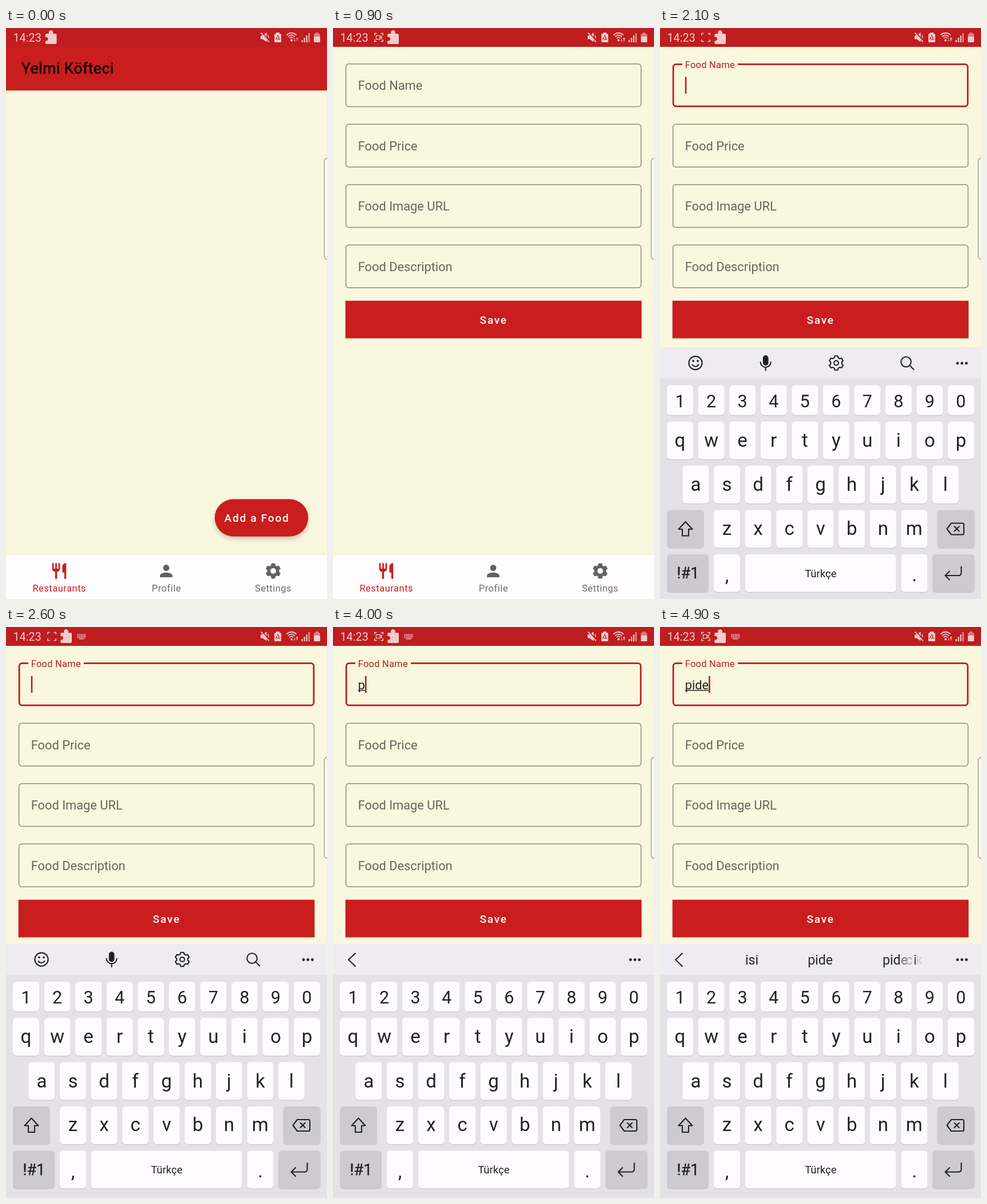
Animation, 561 px wide and 998 px high, one loop 5 s. Source, as an HTML page:

```html
<!DOCTYPE html>
<html lang="en">
<head>
<meta charset="utf-8">
<title>Add a food</title>
<style>
html, body { margin: 0; width: 100%; height: 100%; overflow: hidden; background: #f9f7de; }
svg { display: block; width: 100%; height: 100%; font-family: Roboto, sans-serif; }
text { white-space: pre; }
.mid { text-anchor: middle; }
.btn { font-size: 19.1px; font-weight: 500; letter-spacing: 1.7px; fill: #fff; }
.nav { font-size: 16.4px; letter-spacing: .55px; }
.hint { font-size: 21.84px; fill: #67665c; }
.line { fill: none; stroke: #222; stroke-width: 2.1; stroke-linecap: round; stroke-linejoin: round; }
</style>
</head>
<body>
<svg id="stage" viewBox="0 0 561 998" preserveAspectRatio="none"></svg>
<script>
const LOOP = 5000, TICK = 100;
const RED = '#ca1d1e', DARK_RED = '#b71c20', CREAM = '#f9f7de', INK = '#222', PALE = '#f2cccb';
const TEXT_X = 43.7;

const clamp = (v) => Math.max(0, Math.min(1, v));
const mix = (a, b, u) => a + (b - a) * u;
const within = (t, spans) => spans.some(([from, to]) => t >= from && t < to);

const rect = (x, y, w, h, fill, extra = '') =>
  `<rect x="${x}" y="${y}" width="${w}" height="${h}" fill="${fill}" ${extra}/>`;
const text = (x, y, str, attrs = '') => `<text x="${x}" y="${y}" ${attrs}>${str}</text>`;
const path = (d, attrs = '') => `<path d="${d}" ${attrs}/>`;
const circle = (x, y, r, attrs = '') => `<circle cx="${x}" cy="${y}" r="${r}" ${attrs}/>`;

function gear(cx, cy, outer, inner) {
  const pts = [];
  for (let i = 0; i < 6; i++) {
    const a = (i * 60 - 90) * Math.PI / 180;
    for (const [da, r] of [[-.36, inner], [-.21, outer], [.21, outer], [.36, inner]]) {
      pts.push((cx + r * Math.cos(a + da)).toFixed(2) + ' ' + (cy + r * Math.sin(a + da)).toFixed(2));
    }
  }
  return 'M' + pts.join('L') + 'Z';
}

function statusBar() {
  const bars = [0, 1, 2, 3].map((i) =>
    rect(516.5 + i * 4, 21 - i * 4, 2.2, 4 + i * 4, PALE, i > 2 ? 'opacity=".75"' : '')).join('');
  const arcs = [4.5, 8.2, 12].map((r) => {
    const d = r * .72;
    return path(`M${499 - d} ${21 - d}A${r} ${r} 0 0 1 ${499 + d} ${21 - d}`);
  }).join('');
  let dots = '';
  for (let i = 0; i < 18; i++) dots += rect(124.5 + i % 6 * 2.6, 12.5 + Math.floor(i / 6) * 2.5, 1.7, 1.6, PALE);
  return rect(0, 0, 561, 33, '#bf1d1f') +
    text(12.5, 24, '14:23', `font-size="19.8" fill="${PALE}"`) +
    `<g id="record" fill="none" stroke="${PALE}" stroke-width="1.5">` +
      path('M72.8 13V9.5H76.5M83.5 9.5H87.2V13M87.2 20V23.5H83.5M76.5 23.5H72.8V20') +
      `<g id="camera">${path('M75.5 13.4H82V19.6H75.5ZM82 16L85 14V19L82 17.2', 'stroke-width="1.2"')}</g></g>` +
    `<g id="puzzle" fill="${PALE}">` +
      path('M97 10H101.5A4 4 0 1 1 108.5 10H113Q115 10 115 12V26Q115 28 113 28H97Q95.3 28 95.3 26V22.2A3.4 3.4 0 1 0 95.3 16V12Q95.3 10 97 10Z') + '</g>' +
    `<g id="imeIcon">${dots}${rect(127.5, 20, 9, 1.3, PALE)}</g>` +
    path('M445 13.2H448.5L455.5 8V24.5L448.5 19.5H445Z', `fill="${PALE}"`) +
    path('M446.5 7.6L461 23.6', 'stroke="#bf1d1f" stroke-width="2.4"') +
    path('M445.6 8.4L459.8 24.4', `stroke="${PALE}" stroke-width="1.6"`) +
    path('M457.5 12.5Q459.6 14.8 458.8 17.8', `fill="none" stroke="${PALE}" stroke-width="1.4"`) +
    rect(469, 10, 12, 15, PALE, 'rx="1.6"') + rect(472, 8, 6, 3, PALE) +
    path('M475 13.5L478.2 19.5H471.8Z', 'fill="none" stroke="#bf1d1f" stroke-width="1.5" stroke-dasharray="4.6 1.6"') +
    `<g fill="none" stroke="${PALE}" stroke-width="1.9">${arcs}</g>` + circle(499, 21.5, 2, `fill="${PALE}"`) +
    `<g fill="none" stroke="${PALE}" stroke-width="1.2">` +
      path('M504.5 23V17.5M502.8 21.3L504.5 23.2L506.2 21.3', 'opacity=".6"') +
      path('M508.7 23.2V17.5M507 19.3L508.7 17.4L510.4 19.3', 'id="upload"') + '</g>' +
    bars + rect(538, 10, 11, 15, PALE, 'rx="1.6" opacity=".55"') + rect(541, 8, 5, 2, PALE, 'opacity=".55"') +
    rect(538, 15, 11, 10, PALE, 'rx="1.4"');
}

function navBar() {
  const icon = (cx, d, fill) => path(d, `fill="${fill}" transform="translate(${cx - 16.4} 932.6) scale(1.365)"`);
  const label = (cx, str, fill) => text(cx, 984.5, str, `class="nav mid" fill="${fill}"`);
  return rect(0, 920, 561, 1, '#f1efdc') + rect(0, 921, 561, 77, '#fffdfe') +
    icon(93, 'M11 9H9V2H7v7H5V2H3v7c0 2.1 1.7 3.8 3.75 4V22h2.5v-9C11.3 12.8 13 11.1 13 9V2h-2zM16 6v8h2.5v8H21V2c-2.8 0-5 2.2-5 4z', RED) +
    icon(280, 'M12 12a4 4 0 1 0 0-8a4 4 0 0 0 0 8zM12 14c-2.7 0-8 1.3-8 4v2h16v-2c0-2.7-5.3-4-8-4z', '#626163') +
    path(gear(467, 949, 13.2, 10), 'fill="#626163" stroke="#626163" stroke-linejoin="round"') +
    circle(467, 949, 4.9, 'fill="#fffdfe"') +
    label(93.3, 'Restaurants', RED) + label(280.4, 'Profile', '#6b6a6c') + label(467, 'Settings', '#6b6a6c');
}

function listScreen() {
  return rect(0, 33, 561, 888, CREAM) +
    rect(0, 33, 561, 76, RED, 'style="filter:drop-shadow(0 1px 1.5px #0003)"') +
    text(26.5, 80, 'Yelmi Köfteci', 'font-size="27.3" font-weight="500" fill="#1c0606"') +
    rect(364.8, 823.4, 163.4, 65.4, RED, 'rx="32.7" style="filter:drop-shadow(0 4px 4px #0003)"') +
    `<clipPath id="pill">${rect(364.8, 823.4, 163.4, 65.4, '#fff', 'rx="32.7"')}</clipPath>` +
    `<g clip-path="url(#pill)">${circle(446, 856, 1, 'id="ripple" fill="#fff"')}</g>` +
    text(381.5, 863.3, 'Add a Food', 'class="btn"');
}

function formScreen() {
  const fields = ['Food Name', 'Food Price', 'Food Image URL', 'Food Description'].map((name, i) => {
    const y = 62 + i * 105.5;
    const first = i === 0;
    return rect(22.6, y + .8, 515.8, 74.7, 'none', `rx="5" stroke="#8d8c80" stroke-width="1.5" ${first ? 'id="outline"' : ''}`) +
      (first ? rect(39, 58, 97, 9, CREAM, 'id="notch"') : '') +
      text(TEXT_X, y + 46.1, name, `class="hint" ${first ? 'id="label"' : ''}`);
  }).join('');
  return rect(0, 33, 561, 888, CREAM) + fields +
    text(TEXT_X, 108.5, '', `id="typed" font-size="21.84" fill="${INK}"`) +
    rect(TEXT_X, 110, 0, 1.5, INK, 'id="underline"') +
    rect(TEXT_X, 85.5, 2.6, 29.5, DARK_RED, 'id="cursor"') +
    rect(21.8, 476.7, 517.4, 65.5, RED, 'style="filter:drop-shadow(0 1.5px 1.2px #0003)"') +
    text(256.6, 517, 'Save', 'class="btn"');
}

function keyboard() {
  const STEP = 54.55, WHITE = '#fdfbfe', GREY = '#cdcbcf';
  const key = (x, y, w, h, fill, id = '') =>
    rect(x, y + 1.2, w, h, '#c9c7cc', 'rx="6"') + rect(x, y, w, h, fill, `rx="6" ${id}`);
  const row = (chars, x, y, h, base, size) => [...chars].map((c, i) =>
    key(x + i * STEP, y, 46, h, WHITE, `id="key-${c}"`) +
    text(x + i * STEP + 23, base, c, `class="mid" font-size="${size}" fill="${INK}"`)).join('');
  const tools = '<g id="tools">' +
    `<g class="line">${circle(62, 581, 11.6)}${path('M56.5 584Q62 590.5 67.5 584')}</g>` +
    circle(58, 577.5, 1.7) + circle(66, 577.5, 1.7) +
    rect(179.8, 567.5, 9.6, 18, INK, 'rx="4.8"') +
    `<g class="line">${path('M175.6 579.5A9 9 0 0 0 193.6 579.5M184.6 589V594')}` +
    path(gear(308, 581, 12.6, 9.8)) + circle(308, 581, 4) +
    circle(430, 579, 8.8) + path('M436.5 585.5L443.3 592.3') + '</g></g>';
  const words = '<g font-size="23" fill="#222">' +
    text(160.5, 590, '', 'class="mid" id="word0"') + text(280, 590, '', 'class="mid" id="word1"') +
    text(389, 590, '', 'id="word2"') + '</g>';
  return rect(0, 554, 561, 450, '#e4e2e6') + rect(0, 554, 561, 54, '#eeecf0') +
    tools + `<g id="back" class="line">${path('M39 570.5L27 581.5L39 593')}</g>` + words +
    [520, 527.7, 535.4].map((x) => circle(x, 581.5, 2.4, `fill="${INK}"`)).join('') +
    row('1234567890', 12, 620, 52, 658, 30.5) +
    row('qwertyuiop', 12, 683.3, 66, 727.3, 33) +
    row('asdfghjkl', 39.4, 760.5, 66, 804.5, 33) +
    row('zxcvbnm', 94, 838, 66, 881.3, 33) +
    key(12, 838, 65, 66, GREY) + key(484.5, 838, 65, 66, GREY) +
    key(12, 915.3, 73, 66, GREY) + key(94, 915.3, 46, 66, WHITE) + key(149, 915.3, 263.5, 66, WHITE) +
    key(421.4, 915.3, 46, 66, WHITE) + key(476, 915.3, 73.5, 66, GREY) +
    `<g class="line">${path('M44.5 858.5L56.5 871.5H50V883H39V871.5H32.5Z')}` +
      path('M501.5 871L509 861H528.5Q531 861 531 863.5V878.5Q531 881 528.5 881H509Z') +
      path('M514.5 866.8L522.7 875M522.7 866.8L514.5 875M526.5 937V947.5Q526.5 952.5 521.5 952.5H499M506 945L498.5 952.5L506 960') + '</g>' +
    `<g class="mid" fill="${INK}">` + text(49, 957.5, '!#1', 'font-size="27" stroke="#222" stroke-width=".4"') +
    text(117, 963, ',', 'font-size="33"') + text(444.5, 962, '.', 'font-size="33"') +
    text(280.8, 955.3, 'Türkçe', 'font-size="18.5"') + '</g>';
}

const stage = document.getElementById('stage');
stage.innerHTML = listScreen() + `<g id="form">${formScreen()}</g>` + navBar() + statusBar() +
  path('M563 227.7H561Q556.2 228.5 556.2 234V398Q556.2 403.5 561 404.3H563', 'fill="#fffef6" stroke="#a5a493" stroke-width="1.5"') +
  `<g id="ime">${keyboard()}</g>`;

const $ = (id) => document.getElementById(id);
const set = (id, attrs) => { for (const k in attrs) $(id).setAttribute(k, attrs[k]); };
const show = (id, on) => set(id, { opacity: +on });

const TYPED = [[3800, 'p'], [4300, 'pi'], [4500, 'pid'], [4800, 'pide']];
const PRESSES = [['p', 3700], ['i', 4200], ['d', 4400], ['e', 4700]];
const fading = (x, grey, c) => `<tspan x="${x}" fill="${grey}">${c}</tspan>`;
const HINTS = [
  [4100, ['pek', 'p', 'peki']],
  [4400, ['pis', 'pi', 'pislik']],
  [4600, ['pide', 'pid', 'pideci']],
  [4900, ['isi', 'pide', 'pid' + fading(421, '#77767a', 'e') + fading(429.5, '#b0aeb2', 'c') +
    fading(443, '#444', 'i') + fading(447, '#cfcdd1', 'k')]]
];
const latest = (list, t, none) => list.reduce((value, [at, next]) => t >= at ? next : value, none);

function render(t) {
  // status icons
  const slide = clamp((t - 50) / 300);
  set('puzzle', { transform: `translate(${-26.5 * (1 - slide) ** 2} 0)` });
  show('record', clamp((t - 100) / 300));
  show('camera', within(t, [[0, 1200], [1700, 2100], [2700, 3300], [3800, 4300], [4700, LOOP]]));
  set('imeIcon', { opacity: clamp((t - 2200) / 200) });
  set('upload', { opacity: t < 300 ? .6 : 1 });

  // button press, then the form
  const press = clamp((t - 250) / 350);
  set('ripple', { r: 90 * press, opacity: t < 700 ? .22 * Math.min(1, press * 2) : 0 });
  set('form', { opacity: 1 - (1 - clamp((t - 600) / 300)) ** 2 });

  // focused field: the border thickens inwards
  const focus = clamp((t - 1640) / 180), focused = focus > 0;
  const border = focused ? 2.73 : 1.5;
  set('outline', {
    x: 21.8 + border / 2, y: 62 + border / 2, width: 517.4 - border, height: 76.3 - border,
    stroke: focused ? DARK_RED : '#8d8c80', 'stroke-width': border
  });
  set('notch', { width: 97 * focus, x: 87.5 - 48.5 * focus });
  $('label').style.cssText = `font-size:${mix(21.84, 16.4, focus)}px;letter-spacing:${.3 * focus}px` +
    (focused ? `;fill:${DARK_RED}` : '');
  set('label', { y: mix(108.1, 69.8, focus) });

  // typing
  const typed = latest(TYPED, t, '');
  $('typed').textContent = typed;
  const width = typed ? $('typed').getComputedTextLength() : 0;
  set('underline', { width });
  set('cursor', { x: TEXT_X + width });
  show('cursor', within(t, [[1800, 2200], [2600, 3200], [3700, LOOP]]));

  // keyboard
  const drop = t < 2200 ? 89 * .0506 ** ((t - 2000) / 100) : 0;
  set('ime', { opacity: clamp(.3 + .7 * (t - 2000) / 100), transform: `translate(0 ${Math.min(444, drop)})` });
  show('tools', t < 4000);
  show('back', t >= 4000);
  for (const [c, at] of PRESSES) set('key-' + c, { fill: within(t, [[at, at + 100]]) ? '#cfcdd2' : '#fdfbfe' });
  latest(HINTS, t, ['', '', '']).forEach((word, i) => { $('word' + i).innerHTML = word; });
}

const start = performance.now();
function frame() {
  const t = (performance.now() - start) % LOOP;
  render(Math.floor(t / TICK) * TICK);
  requestAnimationFrame(frame);
}
render(0);
requestAnimationFrame(frame);
</script>
</body>
</html>
```
